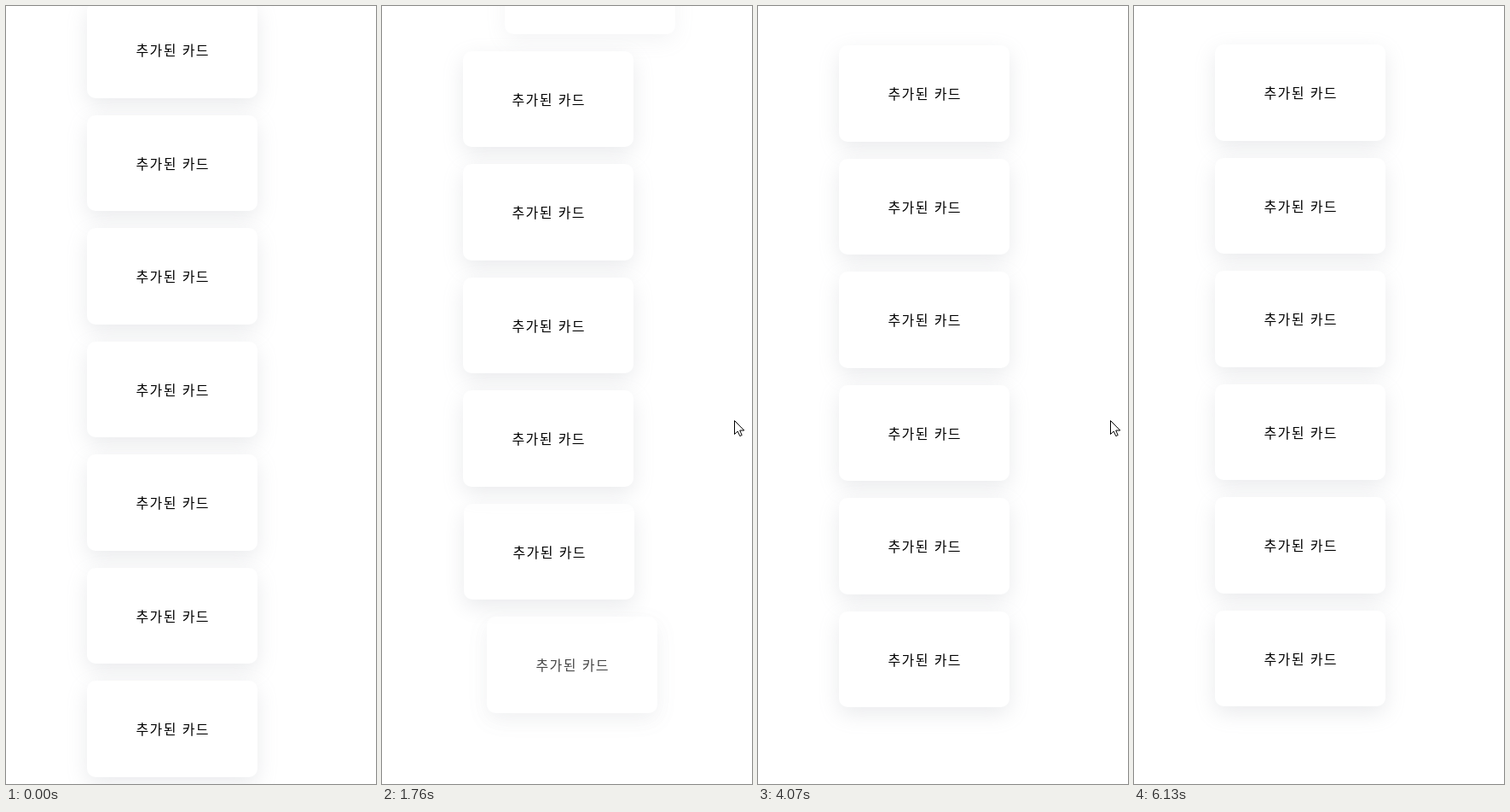
Write an HTML page that moves like this. It is 434 px wide and 911 px high and loops after 6.34 s.

```html
<!DOCTYPE html>
<html lang="ko">
<head>
<meta charset="utf-8">
<style>
  html, body { margin: 0; width: 100%; height: 100%; overflow: hidden; background: #fff; }
  #stage { position: relative; width: 434px; height: 911px; overflow: hidden; }
  .card {
    position: absolute; left: 95px; top: 0; width: 200px;
    border-radius: 10px; background: #fff; color: #000;
    box-shadow: 0 8px 24px rgba(149, 157, 165, .2);
    font: 300 16px/112px "Noto Sans CJK KR", "Noto Sans CJK", "Noto Sans CJK JP", sans-serif;
    letter-spacing: 1.4px; text-indent: 1.4px; text-align: center; white-space: nowrap;
  }
  #cursor { position: absolute; left: 0; top: 0; width: 14px; height: 21px; overflow: visible; }
</style>
</head>
<body>
<div id="stage">
  <svg id="cursor" viewBox="0 0 14 21">
    <path d="M.5 .5V16.5L4.2 13L6.8 18.6L9.2 17.5L6.7 12H11.8Z" fill="#fff" stroke="#000" stroke-linejoin="round"/>
  </svg>
</div>
<script>
const LOOP = 6340, STEP = 68.05, PITCH = 132.5, HEIGHT = 112.5, FIRST_TOP = 127.75;
const ENTER_TOP = 803, EXIT_TOP = -30, LAG = 15, FADE = 150, SLIDE = 100;
const FLICK = 300;

// wheel flicks grouped by distance
const flicks = [
  { distance: 242, starts: [850, 1110] },
  { distance: 260.4, starts: [1525, 2130] },
  { distance: 195.2, starts: [2755] },
  { distance: 203.5, starts: [3300] },
  { distance: 267, starts: [4040, 4510] },
  { distance: 265, starts: [4830, 5200, 5520] }
];

const clamp = v => Math.min(1, Math.max(0, v));
const span = (t, start, end) => clamp((t - start) / (end - start));
const mix = (a, b, u) => a + (b - a) * u;
const inOut = u => u < .5 ? 4 * u ** 3 : 1 - 4 * (1 - u) ** 3;
const outEase = u => 1 - (1 - u) ** 3.5;

function scrollAt(t) {
  let sum = 0;
  for (const { distance, starts } of flicks)
    for (const start of starts) sum += distance * inOut(span(t, start, start + FLICK));
  return sum;
}

function bisect(reached, lo, hi) {
  for (let i = 0; i < 24; i++) {
    const mid = (lo + hi) / 2;
    if (reached(mid)) hi = mid; else lo = mid;
  }
  return hi;
}

// same curve as the CSS "ease" keyword
function ease(x) {
  if (x <= 0) return 0;
  if (x >= 1) return 1;
  const bezier = (s, a, b) => 3 * (1 - s) ** 2 * s * a + 3 * (1 - s) * s * s * b + s ** 3;
  return bezier(bisect(s => bezier(s, .25, .25) >= x, 0, 1), .1, 1);
}

function crossTime(distance) {
  if (distance <= 0) return -Infinity;
  if (distance > scrollAt(LOOP)) return Infinity;
  return bisect(t => scrollAt(t) >= distance, 0, LOOP) + LAG;
}

const stage = document.getElementById("stage");
const cursor = document.getElementById("cursor");
const cards = [];
for (let i = -1; i < 30; i++) {
  const el = document.createElement("div");
  const y = FIRST_TOP + i * PITCH;
  el.className = "card";
  el.textContent = "추가된 카드";
  stage.insertBefore(el, cursor);
  cards.push({ el, y, enter: crossTime(y - ENTER_TOP), exit: crossTime(y - EXIT_TOP) });
}

function place(el, x, y) {
  el.style.transform = `translate(${Math.round(x)}px, ${Math.round(y)}px)`;
}

function drawCard({ el, y, enter, exit }, t, scroll) {
  const top = y - scroll;
  const shown = ease((t - enter) / FADE) - ease((t - exit) / FADE);
  el.style.display = shown > 0 ? "block" : "none";
  el.style.height = Math.round(top + HEIGHT) - Math.round(top) + "px";
  el.style.opacity = shown;
  place(el, SLIDE * (1 - shown), top);
}

// the pointer rises from the bottom edge, rests, then drops out again
function drawCursor(t) {
  const arrive = span(t, 45, 272), leave = outEase(span(t, 5580, 6124));
  place(cursor, mix(mix(404, 413, arrive), 408, leave), mix(mix(920, 485, arrive), 920, leave));
}

function draw(time) {
  const t = Math.floor((time % LOOP + 18) / STEP) * STEP;
  const scroll = scrollAt(t);
  cards.forEach(card => drawCard(card, t, scroll));
  drawCursor(t);
}

const began = performance.now();
function tick() {
  draw(performance.now() - began);
  requestAnimationFrame(tick);
}
tick();
</script>
</body>
</html>
```
